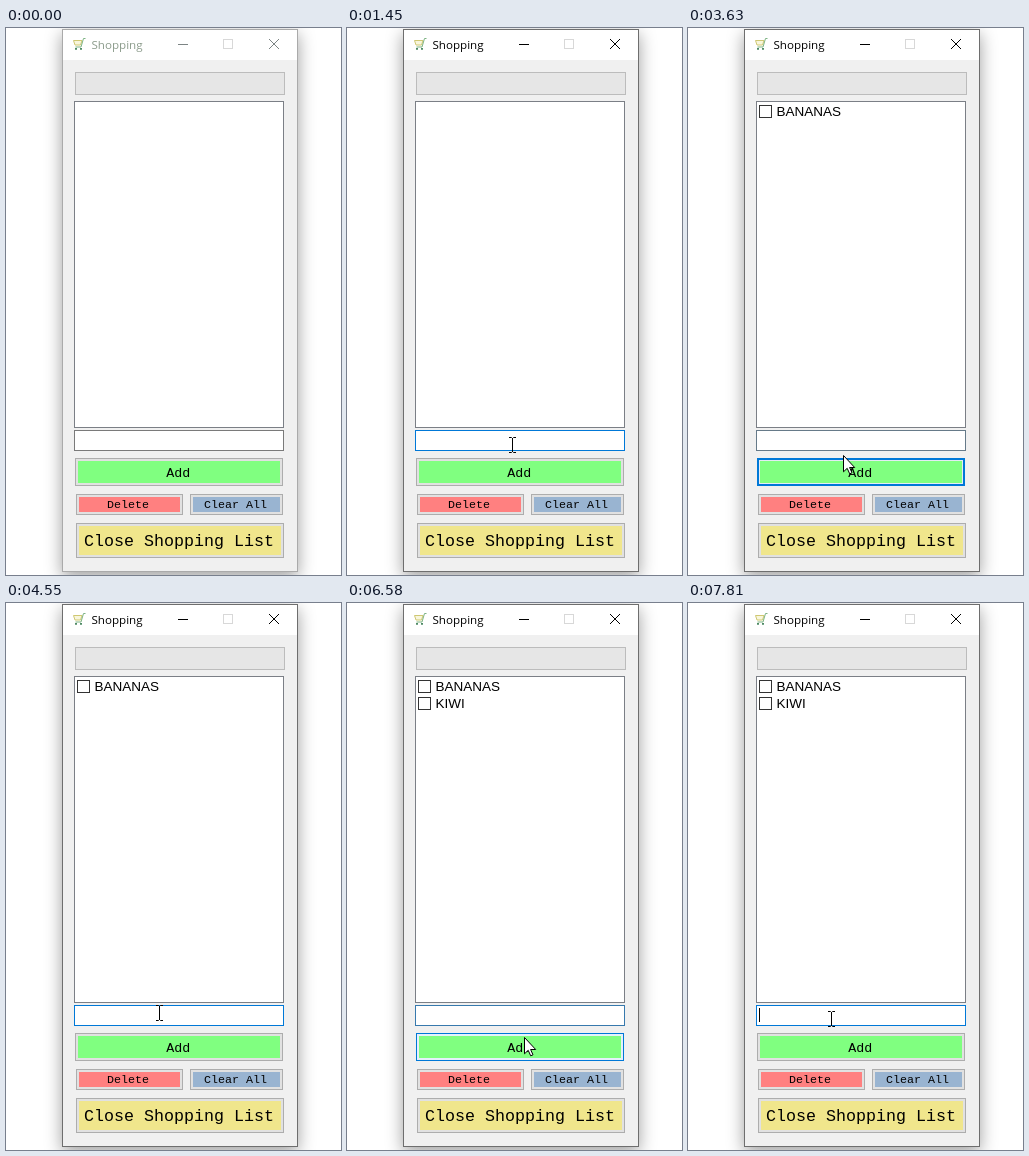
An HTML page that plays this animation: 335x547 px, repeating every 8000 ms.

```html
<!DOCTYPE html>
<html lang="en">
<head>
<meta charset="utf-8">
<title>Shopping</title>
<style>
  html, body { margin: 0; width: 100%; height: 100%; overflow: hidden; background: #fff; }
  svg { position: absolute; left: 0; top: 0; }
  #shade { position: absolute; left: 56px; top: 1px; width: 236px; height: 543px;
           box-shadow: 0 5px 16px rgba(0, 0, 0, .38); }
  text { white-space: pre; }
  .mono { font-family: "Liberation Mono", monospace; }
  .list { font: 13.5px "Liberation Sans", sans-serif; }
  .title { font: 11.6px "Open Sans", sans-serif; }
</style>
</head>
<body>
<div id="shade"></div>
<svg id="stage" width="335" height="547" viewBox="0 0 335 547"></svg>
<script>
const LOOP = 8000, BLINK = 550, KEY_GAP = 130, STEP = 77, ACTIVATE = 820;
const GREY = [122, 122, 122], DARK = [23, 23, 23], BLUE = [0, 120, 215];

// Times when the box is focused, typing starts, the pointer returns and Add is clicked
const entries = [
  { word: "bananas", focus: 900, type: 1750, back: 3120, add: 3480 },
  { word: "kiwi", focus: 4000, type: 4630, back: 5970, add: 6500 },
  { word: "", focus: 7600, type: LOOP, back: LOOP, add: LOOP }
];

// When the pointer is over Add
const visits = [[285, 590], [3140, 3580], [6180, 6640]];

// Pointer path: time, x, y
const path = [
  [210, 172, 560], [360, 168, 443], [670, 165, 417], [3080, 165, 417],
  [3233, 158, 445], [3480, 157, 440], [3790, 153, 410], [5970, 153, 410],
  [6350, 177, 434], [6580, 177, 434], [7040, 145, 410], [7600, 143, 416]
];

const rect = (x, y, w, h, fill, stroke, id = "") =>
  `<rect id="${id}" x="${x + .5}" y="${y + .5}" width="${w - 1}" height="${h - 1}" fill="${fill}" stroke="${stroke}"/>`;

const button = (x, y, w, h, fill, label, size, tx, ty, id) =>
  rect(x, y, w, h, "#e1e1e1", "#adadad", id) +
  `<rect x="${x + 3}" y="${y + 3}" width="${w - 6}" height="${h - 6}" fill="${fill}"/>
   <text class="mono" font-size="${size}" x="${tx}" y="${ty}">${label}</text>`;

const item = (word, i) =>
  `<g id="item${i}">${rect(71, 77 + 17 * i, 13, 13, "#fff", "#333")}
   <text class="list" x="88.5" y="${88 + 17 * i}">${word.toUpperCase()}</text></g>`;

document.getElementById("stage").innerHTML =
  rect(56, 1, 236, 543, "#f0f0f0", "#aaa", "frame") + `
  <path d="M57 2h234v30H57z" fill="#fff"/>
  <g fill="none">
    <path d="M67.5 12.5h8.5l-1.5 4.5H69z" fill="#f8f6dc" stroke="#cfc873"/>
    <path d="M79.5 10.5h-2l-2.5 8.5H69.5" stroke="#7db383"/>
    <path d="M69 20.8h2M74 20.8h2" stroke="#4f8a66" stroke-width="1.8"/>
  </g>
  <text id="title" class="title" x="85.5" y="21">Shopping</text>
  <path id="caption" fill="none" d="M172 16.5h10M263 11l10 10m0-10l-10 10"/>` +
  rect(217, 11, 10, 10, "none", "#d8d8d8") +
  rect(69, 44, 210, 23, "#e6e6e6", "#bcbcbc") +
  rect(68, 73, 210, 327, "#fff", "#7b7f86") +
  item(entries[0].word, 0) + item(entries[1].word, 1) +
  rect(68, 402, 210, 21, "#fff", "#7a7a7a", "box") + `
  <text id="typed" class="mono" font-size="11.67" x="71" y="416"></text>
  <rect id="caret" y="405" width="1" height="14"/>` +
  button(69, 430, 208, 28, "#80ff80", "Add", 13.33, 160.3, 449, "add") + `
  <rect id="ring" x="70" y="431" width="206" height="26" fill="none" stroke="#0078d7" stroke-width="2"/>` +
  button(70, 466, 107, 21, "#ff8080", "Delete", 11.67, 101, 480) +
  button(184, 466, 93, 21, "#99b4d1", "Clear All", 11.67, 198, 480) +
  button(70, 495, 208, 35, "#f0e68c", "Close Shopping List", 16.67, 78, 518) + `
  <path id="arrow" d="M.5.5v16.3l3.7-3.5 2.5 5.5 2.3-1-2.4-5.3h5.1z" fill="#fff" stroke="#000"/>
  <path id="beam" fill="none" stroke="#000" d="M-3-7.5h2.5l1 1 1-1h2.5M.5-7V7M-3 7.5h2.5l1-1 1 1h2.5"/>`;

const el = id => document.getElementById(id);
const set = (id, name, value) => el(id).setAttribute(name, value);
const show = (id, on) => set(id, "visibility", on ? "visible" : "hidden");
const clamp = v => Math.min(1, Math.max(0, v));
const mix = (a, b, k) => a.map((v, i) => v + (b[i] - v) * k);
const rgb = c => `rgb(${c.map(Math.round)})`;

// Amount that rises after "on" and falls after "off"
const fade = (t, on, off) => clamp((t - on) / 180) - clamp((t - off) / 180);

function pointer(t) {
  const s = Math.floor(t / STEP) * STEP;
  const i = path.findIndex(k => k[0] > s);
  const b = path.at(i), a = path[i - 1] || b;
  return mix(a, b, clamp((s - a[0]) / (b[0] - a[0] || 1))).slice(1).map(Math.round);
}

function draw(t) {
  const active = t >= ACTIVATE;
  set("frame", "stroke", active ? "#6e6e6e" : "#aaa");
  set("title", "fill", active ? "#000" : "#8c9c8c");
  set("caption", "stroke", active ? "#000" : "#7c8484");

  const [x, y] = pointer(t);
  const visible = !entries.some(e => t >= e.type && t < e.back);
  const inBox = y >= 402 && y < 423;
  show("arrow", visible && !inBox);
  show("beam", visible && inBox);
  for (const id of ["arrow", "beam"]) set(id, "transform", `translate(${x} ${y})`);

  const hover = Math.max(...visits.map(v => fade(t, ...v)));
  set("add", "stroke", rgb(mix([173, 173, 173], BLUE, hover)));
  set("add", "fill", rgb(mix([225, 225, 225], [229, 241, 251], hover)));

  const focus = Math.max(...entries.map(e => fade(t, e.focus, e.add)));
  set("box", "stroke", rgb(mix(inBox && visible ? DARK : GREY, BLUE, focus)));

  const entry = entries.find(e => t >= e.focus && t < e.add);
  show("ring", !entry && t >= entries[0].add && y < 430);
  for (const i of [0, 1]) show("item" + i, t >= entries[i].add);

  const { word, focus: start, type } = entry || entries[2];
  const keys = t < type ? 0 : Math.min(word.length, 1 + Math.floor((t - type) / KEY_GAP));
  const last = keys ? type + (keys - 1) * KEY_GAP : start;
  el("typed").textContent = word.slice(0, keys);
  set("caret", "x", 71 + 7 * keys);
  show("caret", entry && Math.floor((t - last) / BLINK) % 2 === 0);
}

const began = performance.now();
function tick() {
  draw((performance.now() - began) % LOOP);
  requestAnimationFrame(tick);
}
tick();
</script>
</body>
</html>
```
